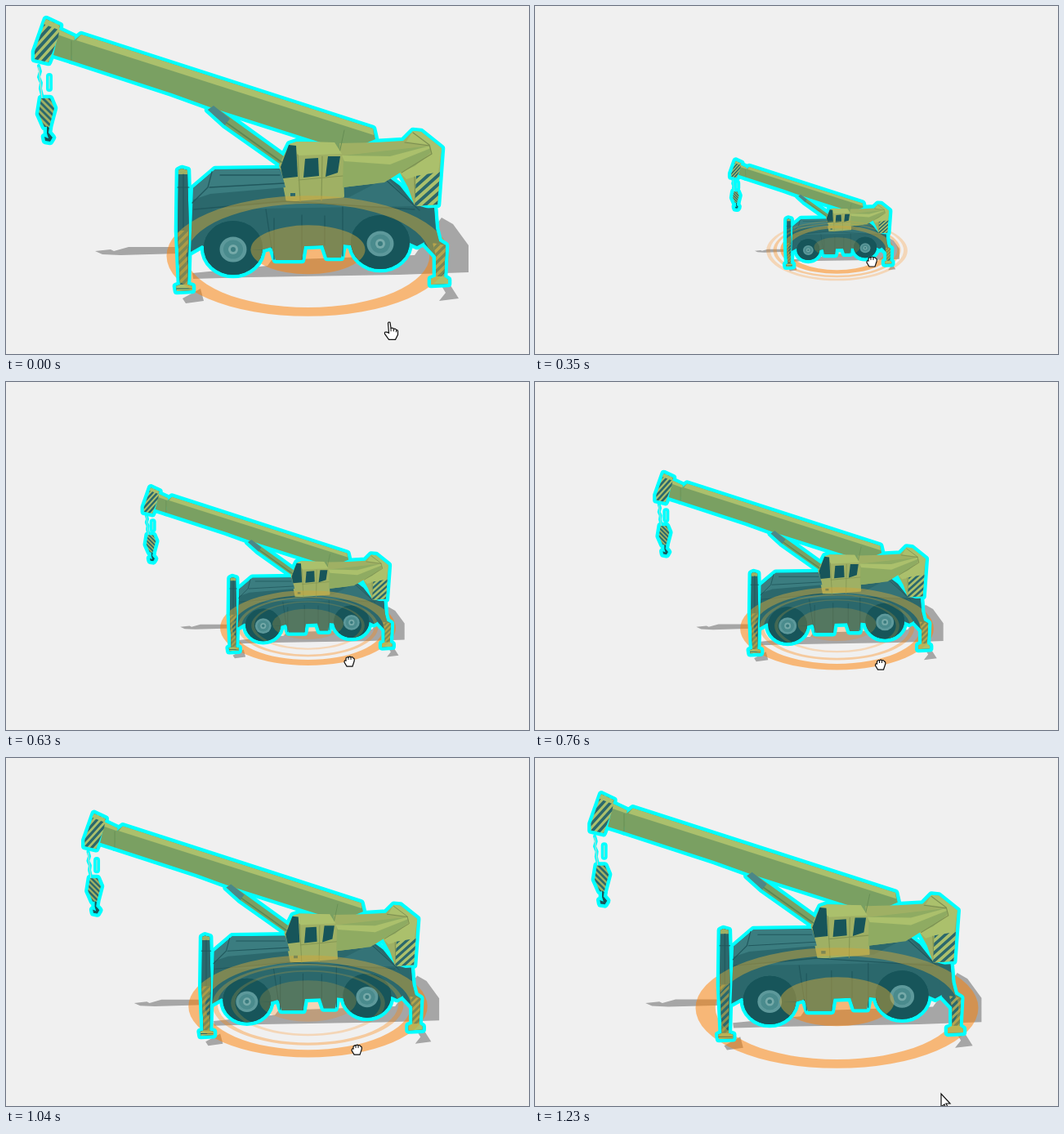
An HTML page with a canvas for the animation above (1.28 s loop, 640 by 426 pixels).

```html
<!DOCTYPE html>
<html lang="en">
<head>
<meta charset="utf-8">
<title>Scaling a crane</title>
<style>
  html, body { margin: 0; height: 100%; overflow: hidden; background: #f0f0f0; }
  canvas { display: block; }
</style>
</head>
<body>
<canvas id="stage" width="640" height="426"></canvas>
<script>
const ctx = document.getElementById('stage').getContext('2d');
const LOOP = 1280, GRAB = 40, TURN = 430, RELEASE = 1130, ARROW = 1210;
const CX = 370, CY = 299.5;
const LIGHT = '#abc06c', SIDE = '#7aa062', CAB = '#9fb064', DARK = '#17555a',
      BODY = '#2b686c', TOP = '#3b7d80', CYAN = '#00ffff';

// time, crane scale, cursor x, cursor y
const KEYS = [
  [0, 1, 471, 398], [GRAB, 1, 452, 372], [170, .678, 424, 327], [350, .388, 412, 313],
  [TURN, .345, 411, 313], [630, .6, 420, 342], [890, .722, 425, 350], [1040, .816, 429, 357],
  [RELEASE, .895, 432, 363], [1180, .9, 452, 384], [1230, .9, 502, 420], [LOOP, .9, 502, 420]
];

const path = d => new Path2D(d);
const oval = (x, y, rx, ry) => {
  const p = new Path2D();
  p.ellipse(x, y, rx, ry, 0, 0, 7);
  return p;
};

const body = path('M229 223L256 200L336 199L466 208L482 220L500 243L524 250L527 296L512 289L503 294L494 290L422 293L413 292L410 308H393L388 293L365 294L362 311H330L325 295L315 298L250 299L240 293L226 301Z');
const hubs = [[278, 298], [458, 291]];
const tyres = hubs.map(([x, y]) => oval(x, y - 2, 36, 33));
const leftLeg = path('M211 201L215 199L222 201L224 275L222 341L228 343V348L209 349L208 343L213 341L210 275Z');
const rightLeg = path('M506 248L524 247L526 272L530 288L538 293L536 332L541 335V340L520 341V334L526 332V306L512 291Z');
const boomHead = path('M49 16L66 24L64 38L52 69L35 65V56Z');
const boomNeck = path('M65 29L84 38L80 67L58 60Z');
const boom = path('M92 35L449 150L452 163L410 181L385 167L275 132L250 124L203 107L80 67L82 43Z');
const ram = path('M247 127L254 122L340 184L336 194L268 146Z');
const tail = path('M408 168L452 167L486 165L498 153L508 154L533 174L528 243L500 245L492 222L482 204L463 216L412 222Z');
const cab = path('M347 169L356 166L402 167L412 183L414 233L411 240L343 240L334 195Z');
const hookBlock = path('M43 113H54L59 125L53 148H47L40 132Z');
const hook = path('M50 147L53 149L52 155L57 161L54 166L48 165L47 160L52 162L50 156Z');
const parts = [
  [body, BODY], ...tyres.map(p => [p, DARK]), [leftLeg, BODY], [rightLeg, BODY],
  [ram, SIDE], [boom, SIDE], [boomNeck, SIDE], [boomHead, LIGHT], [tail, CAB],
  [cab, CAB], [hookBlock, CAB], [hook, DARK]
];
const underRing = new Path2D();
[body, ...tyres, leftLeg, rightLeg].forEach(p => underRing.addPath(p));

const shadow = path('M109 300L128 298L132 300L150 295L212 295V303L140 305L118 304ZM228 327L320 318L325 311L500 305L533 259L547 267L566 293V326L480 329L300 332L229 334ZM524 328L540 336L554 358L530 361L538 351ZM216 358L238 346L242 361L220 364Z');

const handPointer = path('M-3 -9Q-2.5 -11 -.5 -10L.5 -3Q3 -4 4 -2Q6 -3 7 -1Q9 -1 9 1V5L6 11H-2L-7 4Q-8 1 -4 2L-2 3Z');
const handGrab = path('M-4 -1V-4Q-2 -6 -1 -5Q1 -7 2 -5Q4 -6 5 -4Q7 -4 6 0L4 6H-3L-6 1Q-6 -2 -4 -1Z');
const arrow = path('M-5 -9V7L-1 4L1 10L4 9L1 3H6Z');

function fill(shape, color) {
  ctx.fillStyle = color;
  ctx.fill(typeof shape === 'string' ? path(shape) : shape);
}

function line(d, color, width) {
  ctx.strokeStyle = color;
  ctx.lineWidth = width;
  ctx.stroke(path(d));
}

// Diagonal warning stripes inside a shape; slope 1 falls to the right.
function hatch(shape, x, y, w, h, slope, gap = 10) {
  ctx.save();
  ctx.clip(shape);
  for (let i = -2 * w; i < h + 2 * w; i += gap)
    line(`M${x} ${y + i}L${x + w} ${y + i + slope * w}`, BODY, gap * .36);
  ctx.restore();
}

function ring(rx, hole) {
  const cy = 306 - (173 - rx) * .075, p = oval(CX - .5, cy, rx, rx * .427);
  if (hole) p.addPath(oval(CX - .5, cy - .5, rx * hole, rx * .427 * hole));
  ctx.fill(p, 'evenodd');
}

function gizmo(t, scale, rgb) {
  const dragging = t >= GRAB && t < RELEASE;
  const rx = dragging ? 179 * scale : 173;
  const tint = alpha => ctx.fillStyle = `rgba(${rgb},${alpha})`;
  tint(.5);
  ring(rx, .86);
  tint(dragging ? .25 : .5);
  ring(rx * .405);
  if (!dragging) return;
  const echoes = t < TURN ? [1.125, 1.245] : [.8, .645];
  echoes.forEach((k, i) => {
    tint(.34 - i * .1);
    ring(rx * k, .945);
  });
}

function drawBody() {
  fill('M256 200H336L342 222L250 230L229 237V223Z', TOP);
  fill('M342 240L420 234L466 210L500 245L430 246L250 249Z', '#347377');
  line('M252 203L247 222L228 241M262 207H335M249 222L340 217M230 249L340 239L500 249M318 249L325 296M328 260V310M362 256V310M390 257V293M412 246V306M466 214L506 250', '#20585d', 1.3);
  tyres.forEach(p => fill(p, DARK));
  for (const [x, y] of hubs) {
    fill(oval(x, y, 16.5, 15.5), '#5d999b');
    fill(oval(x, y, 12, 11.5), '#4a8b8d');
    fill(oval(x, y, 6, 6), '#76aaa9');
    fill(oval(x, y, 3, 3), TOP);
  }
}

function drawLegs() {
  fill(leftLeg, BODY);
  const lower = path('M210 275H223L222 341H213Z');
  fill(lower, '#899155');
  hatch(lower, 208, 304, 18, 36, -1);
  fill('M211 201L215 199L222 201V206H211Z', CAB);
  fill('M208 343L213 341H222L228 343V348L209 349Z', LIGHT);
  line('M210 222H224M217 206V274M209 346H227', '#20585d', 1.2);
  const rightLower = path('M522 290L538 293L536 332H526V306Z');
  fill(rightLower, '#a0a45c');
  hatch(rightLower, 522, 305, 18, 28, -1);
  fill('M520 334L526 331H536L541 335V340L520 341Z', LIGHT);
}

function drawUpper() {
  fill('M247 127L254 122L274 138L268 146Z', '#4b8788');
  line('M270 143L337 191', '#5e8653', 2);
  fill('M92 35L449 150L450 158L86 42Z', LIGHT);
  fill('M65 29L84 38L83 42L63 35Z', LIGHT);
  line('M80 43V66M414 152L408 180', '#668d54', 1);
  hatch(boomHead, 32, 15, 38, 58, -1.1, 11);
  fill('M49 16L66 24L64 29L46 22Z', LIGHT);
  hatch(hookBlock, 37, 113, 24, 36, 1, 8);
  // superstructure and counterweight
  fill('M413 183L520 171L519 180L498 198L482 204L463 216L412 222Z', '#8fab62');
  fill('M411 183L470 184L519 171L520 174L470 194L414 190Z', LIGHT);
  fill('M498 153L508 154L533 174L521 181L519 170L490 166Z', LIGHT);
  fill('M482 204L500 196L521 180L533 174L529 205L500 209L490 212Z', LIGHT);
  line('M498 155L518 170L521 181L484 204M500 209L501 244M488 167L518 171', '#7c9051', 1.2);
  const plate = path('M502 208L531 203L528 243L500 245Z');
  fill(plate, LIGHT);
  hatch(plate, 498, 208, 36, 38, -.9, 11);
  // cab
  fill('M347 169L356 166L402 167L411 181L358 183Z', LIGHT);
  fill('M346 170L355 171L357 209L339 211L336 197Z', DARK);
  fill('M366 187L382 186L383 208L364 210Z', DARK);
  fill('M394 184L409 184L406 204L391 209Z', DARK);
  line('M357 182L360 239M387 184L386 238M358 213L412 208', '#849653', 1.2);
  fill('M348 229H354V233H348Z', BODY);
}

function drawCrane(scale) {
  ctx.lineJoin = ctx.lineCap = 'round';
  ctx.strokeStyle = CYAN;
  ctx.lineWidth = 8.6 / scale;
  parts.forEach(([p]) => ctx.stroke(p));
  line('M40 73L42 80L40 87L43 94L42 101L44 109', CYAN, 4 / scale);
  line('M53 86V101', CYAN, 8 / scale);
  line('M40 75L44 112M53 86V101', '#c8d4c6', 1.2);
  parts.forEach(([p, color]) => fill(p, color));
  drawBody();
  drawLegs();
  drawUpper();
}

function drawCursor(t, x, y) {
  const shape = t >= GRAB && t < RELEASE ? handGrab : t >= ARROW ? arrow : handPointer;
  ctx.save();
  ctx.translate(x, y);
  fill(shape, '#fff');
  ctx.strokeStyle = '#111';
  ctx.lineWidth = 1.2;
  ctx.stroke(shape);
  if (shape === handPointer) line('M.5 -3V1M4 -2V1M7 -1V2', '#111', 1);
  if (shape === handGrab) line('M-1 -5V-2M2 -5V-2', '#111', 1);
  ctx.restore();
}

function poseAt(t) {
  const i = KEYS.findIndex(k => k[0] > t), a = KEYS[i - 1], b = KEYS[i];
  const u = (t - a[0]) / (b[0] - a[0]);
  return a.map((v, j) => v + (b[j] - v) * u);
}

function zoom(scale) {
  ctx.translate(CX, CY);
  ctx.scale(scale, scale);
  ctx.translate(-CX, -CY);
}

function draw(now) {
  const t = now % LOOP;
  const [, scale, x, y] = poseAt(t);
  ctx.resetTransform();
  ctx.fillStyle = '#f0f0f0';
  ctx.fillRect(0, 0, 640, 426);

  ctx.save();
  zoom(scale);
  fill(shadow, '#a6a6a6');
  ctx.restore();
  gizmo(t, scale, '255,128,0');

  ctx.save();
  zoom(scale);
  drawCrane(scale);
  ctx.clip(underRing);
  ctx.resetTransform();
  gizmo(t, scale, '205,165,60');
  ctx.restore();

  drawCursor(t, x, y);
}

const start = performance.now();
function tick() {
  draw(performance.now() - start);
  requestAnimationFrame(tick);
}
tick();
</script>
</body>
</html>
```
